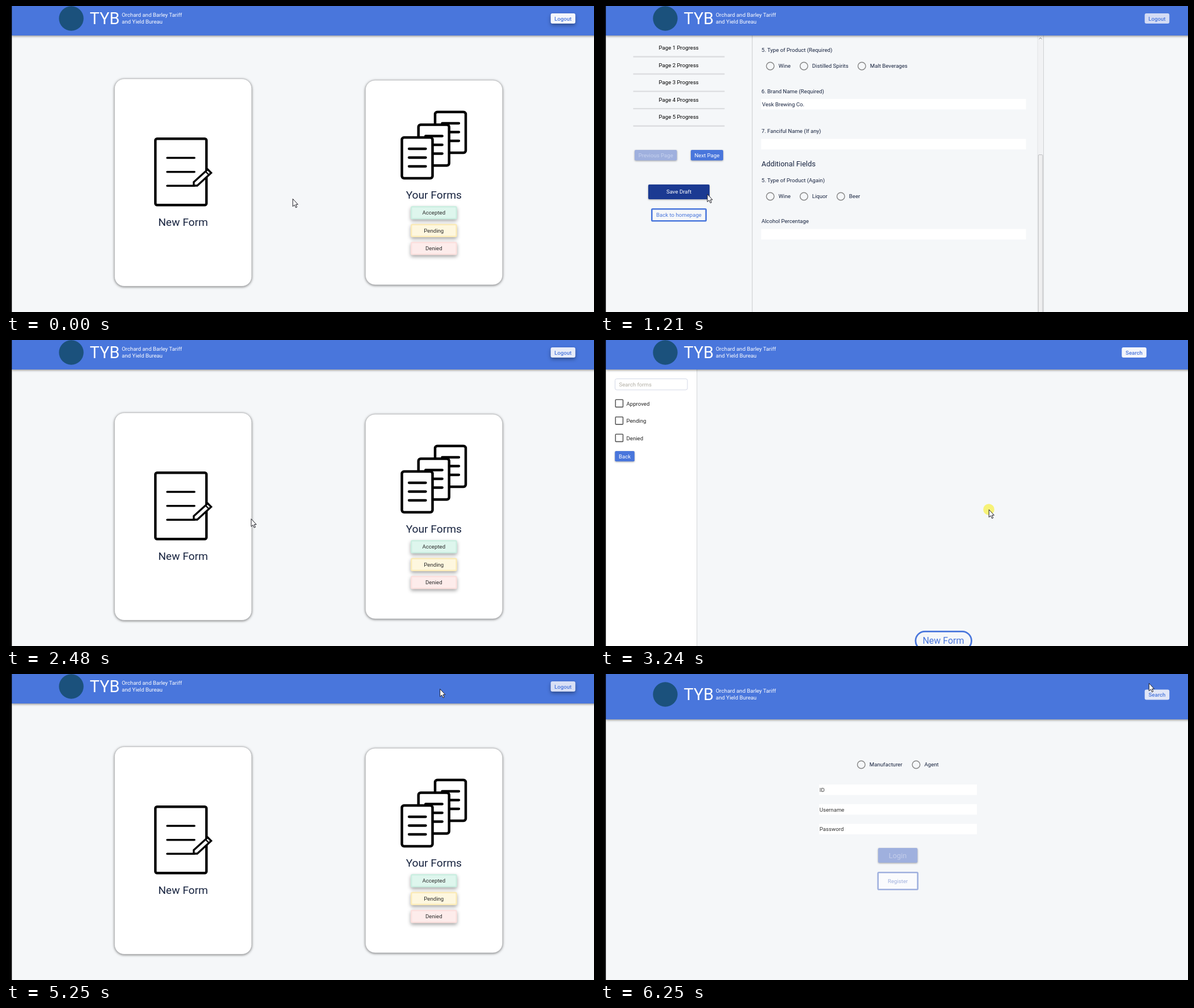
These frames come from a looping animation (1036x540 px, 6.44 s). An HTML page:

```html
<!DOCTYPE html>
<html lang="en">
<head>
<meta charset="utf-8">
<title>Permit forms demo</title>
<style>
html, body { margin: 0; width: 100%; height: 100%; overflow: hidden; background: #f5f7f9; }
svg { display: block; width: 1036px; height: 540px; font-family: Roboto, sans-serif; }
.low { filter: drop-shadow(0 1px 1.5px rgba(0,0,0,.35)); }
.mid { filter: drop-shadow(0 1px 2px rgba(0,0,0,.5)); }
.high { filter: drop-shadow(0 3px 3px rgba(0,0,0,.35)); }
</style>
</head>
<body>
<svg id="stage" viewBox="0 0 1036 540"></svg>
<script>
const LOOP = 6440;
const BLUE = '#4976dc', DARK = '#1b3a92', INK = '#17233f', BG = '#f5f7f9', PALE = '#9fb0de';

// Markup helpers
const rect = (x, y, w, h, fill, more = '') =>
  `<rect x="${x}" y="${y}" width="${w}" height="${h}" fill="${fill}" ${more}/>`;
const text = (x, mid, str, { size = 9.65, fill = INK, anchor = 'start', weight = 400 } = {}) =>
  `<text x="${x}" y="${mid + size * 0.36}" font-size="${size}" fill="${fill}" text-anchor="${anchor}" font-weight="${weight}">${str}</text>`;
const label = (x, mid, str, opt = {}) => text(x, mid, str, { anchor: 'middle', ...opt });
const line = (x1, y1, x2, y2, stroke, w = 1, cap = 'butt') =>
  `<path d="M${x1} ${y1}L${x2} ${y2}" stroke="${stroke}" stroke-width="${w}" stroke-linecap="${cap}"/>`;
const input = (x, y, w) => rect(x, y, w, 18.5, '#fff');
const radio = (x, y, str, gap = 14.5) =>
  `<circle cx="${x}" cy="${y}" r="6.8" fill="none" stroke="#858585" stroke-width="1.4"/>` + text(x + gap, y, str);
const button = (x, y, w, h, str, { fill = BLUE, color = '#fff', id = '', size } = {}) =>
  rect(x, y, w, h, fill, `rx="2" class="low" ${id && `id="${id}"`}`) +
  label(x + w / 2, y + h / 2, str, { fill: color, ...(size && { size }) });

function header(height, btn, btnX, btnCls = '') {
  const mid = height - (height > 60 ? 44 : 30);
  const btnY = height > 60 ? 27.5 : 13;
  return rect(10, -10, 1040, height + 10, BLUE, 'class="mid"') +
    `<circle cx="115" cy="${mid}" r="21.7" fill="#1b517c"/>` +
    text(147.5, mid - 0.7, 'TYB', { size: 28.8, fill: '#fff' }) +
    text(204, mid - 6, 'Orchard and Barley Tariff', { fill: '#fff' }) +
    text(204, mid + 5.3, 'and Yield Bureau', { fill: '#fff' }) +
    rect(btnX, btnY, 43.5, 18, '#f4f6fb', `rx="3" class="nav ${btnCls}"`) +
    label(btnX + 21.7, btnY + 9.2, btn, { fill: BLUE, weight: 500 });
}

function sheet(x, y) {
  let s = rect(x, y, 54, 72, '#fff', 'rx="4" stroke="#000" stroke-width="4.5"');
  for (let i = 0; i < 3; i++) s += line(x + 12.5, y + 20 + i * 15.5, x + 42, y + 20 + i * 15.5, '#000', 4.3, 'round');
  return s;
}

function tag(y, str, fill, edge) {
  return rect(714.2, y + 1.2, 79.3, 21, fill, `rx="2" stroke="${edge}" stroke-width="2.5" class="high"`) +
    label(753.8, y + 11.7, str, { fill: '#2b2b2b' });
}

function home() {
  const card = (x, y, h) => rect(x, y, 241.5, h, '#fff', 'rx="17" stroke="#bdbec1" stroke-width=".8" class="mid"');
  return card(191.3, 128.5, 366) + card(633.3, 131, 361) +
    rect(263.2, 234.3, 90, 117, '#fff', 'rx="3" stroke="#000" stroke-width="4.4"') +
    [268, 292.7, 317.3].map(y => line(284, y, 332, y, '#000', 3.6, 'round')).join('') +
    '<path d="M330.8 317V310.8L355.5 288.3L361.5 294.5L337 317Z" fill="#fff" stroke="#000" stroke-width="3.4"/>' +
    line(351.5, 292, 357.5, 298, '#000', 2.4) +
    label(312, 380.7, 'New Form', { size: 19.2 }) +
    sheet(756, 187) + sheet(726.7, 209.5) + sheet(697.5, 232) +
    label(753.8, 333.5, 'Your Forms', { size: 19.2 }) +
    tag(353, 'Accepted', '#def6ed', '#cbeee1') +
    tag(384.5, 'Pending', '#fef7df', '#fbebb8') +
    tag(416, 'Denied', '#fdeceb', '#fbe0de') +
    header(52, 'Logout', 959.7, 'high');
}

function form() {
  let s = '';
  for (let i = 0; i < 5; i++) {
    const y = 73.7 + i * 30.55;
    s += label(138.7, y, `Page ${i + 1} Progress`, { fill: '#000' }) +
      line(58.5, y + 15.8, 219.5, y + 15.8, '#dcdde0', 2.4);
  }
  s += button(61, 254, 74.5, 18.5, 'Previous Page', { fill: PALE, color: '#c6d1ee' }) +
    button(160, 254, 57, 18.5, 'Next Page') +
    button(85, 315, 108, 26, 'Save Draft', { id: 'save' }) +
    rect(91.3, 358.3, 95.5, 21, BG, `id="backBox" rx="1.5" stroke="${BLUE}" stroke-width="2.6"`) +
    `<g id="backText">${label(139, 368.7, 'Back to homepage')}</g>` +
    rect(771, 52, 10.5, 490, '#f1f2f4') +
    line(268.2, 52, 268.2, 540, '#c9cacd') + line(781.5, 52, 781.5, 540, '#cfd0d3') +
    line(771, 52, 771, 540, '#e2e3e6') +
    '<path d="M773.5 58.5L776 56L778.5 58.5" fill="none" stroke="#8b8b8b"/>' +
    rect(772.3, 262.5, 7.6, 290, '#efeff0', 'rx="1.5" stroke="#bcbdc0"');
  s += text(284.5, 78, '5. Type of Product (Required)') +
    radio(300, 106, 'Wine') + radio(359.3, 106, 'Distilled Spirits') + radio(461.3, 106, 'Malt Beverages') +
    text(284.5, 150.3, '6. Brand Name (Required)') + input(284, 164, 466.5) +
    text(285.5, 173.7, 'Vesk Brewing Co.') +
    text(284.5, 221, '7. Fanciful Name (If any)') + input(284, 234.5, 466.5) +
    text(284.5, 278, 'Additional Fields', { size: 12.9 }) +
    text(284.5, 308, '5. Type of Product (Again)') +
    radio(300, 336, 'Wine') + radio(359.3, 336, 'Liquor') + radio(424.3, 336, 'Beer') +
    text(284.5, 380, 'Alcohol Percentage') + input(284, 393.5, 466.5);
  return s + header(52, 'Logout', 959.7);
}

function search() {
  const box = (y, str) => rect(27.3, y - 6.8, 13.2, 13.2, '#fff', 'rx="1" stroke="#5a5a5a" stroke-width="1.6"') +
    text(46.5, y + 0.3, str, { fill: '#222' });
  return rect(10, 40, 160.5, 500, '#fff') + line(170.8, 40, 170.8, 540, '#d3d5d8') +
    rect(26.5, 68.5, 127.5, 19.5, '#fff', 'rx="3" stroke="#d3d8e6"') +
    text(33.5, 78.7, 'Search forms', { fill: '#b1aea4' }) +
    box(112, 'Approved') + box(142.5, 'Pending') + box(173, 'Denied') +
    button(26.3, 196, 34.5, 18.3, 'Back', { id: 'back' }) +
    rect(556, 514.3, 98.5, 33, BG, `rx="16.5" stroke="${BLUE}" stroke-width="2.8"`) +
    label(605, 530.5, 'New Form', { size: 16, fill: BLUE }) +
    header(52, 'Search', 919.3);
}

function login() {
  const field = (y, str) => input(386, y, 278) + text(386.8, y + 9.5, str, { fill: '#333' });
  return radio(460.3, 160, 'Manufacturer') + radio(557, 160, 'Agent') +
    field(195, 'ID') + field(229.7, 'Username') + field(264.4, 'Password') +
    button(490, 307, 69.3, 26, 'Login', { fill: PALE, color: '#c3cdea', size: 12.8 }) +
    rect(489.8, 350.2, 70, 30, '#fafbfd', `rx="1.5" stroke="${PALE}" stroke-width="2.6"`) +
    label(524.7, 365.5, 'Register', { fill: PALE }) +
    header(80, 'Search', 959.7);
}

const pages = { home, form, search, login };
const stage = document.getElementById('stage');
stage.innerHTML = rect(0, 0, 1036, 540, BG) +
  Object.keys(pages).map(k => `<g id="${k}">${pages[k]()}</g>`).join('') +
  rect(0, 0, 10.3, 540, '#000') +
  '<circle id="halo" r="9.8" fill="#f6f16c" opacity=".92"/>' +
  '<path id="cursor" d="M.3 .3V13.8L3.4 11L5.6 15.8L7.7 14.9L5.6 10.2H9.4Z" fill="#fff" stroke="#1c1c24" stroke-width="1" stroke-linejoin="round"/>';

const $ = id => document.getElementById(id);
const groups = Object.keys(pages).map($);

// Page start, name, start of the nav button fade, final fade level
const timeline = [
  [0, 'home', LOOP, 0],
  [580, 'form', 480, 1],
  [2230, 'home', 2280, 1],
  [3150, 'search', 3220, 1],
  [4820, 'home', 4830, 1],
  [5800, 'login', 5800, 0.65]
];

// Cursor legs: start, end, target, optional bend point
const start = [505, 340];
const legs = [
  [40, 340, [370, 295]],
  [720, 1350, [163, 337]],
  [1380, 1760, [154, 360]],
  [1800, 2000, [167, 364]],
  [2030, 2080, [268, 326]],
  [2190, 2870, [685, 299]],
  [3450, 4090, [75, 314], [340, 533]],
  [4100, 4600, [42, 212]],
  [4780, 5455, [967, 16], [504, 18]]
];
const clicks = [[330, 580], [1970, 2040], [2960, 3330], [4700, 4820], [5490, 5850]];

const clamp = v => Math.max(0, Math.min(1, v));
const ease = u => u * u * (3 - 2 * u);
const within = (t, a, b) => t >= a && t < b;

function cursorAt(t) {
  let p = start;
  for (const [a, b, q, bend] of legs) {
    if (t < a) break;
    const u = ease(clamp((t - a) / (b - a)));
    const from = p, c = bend || [(p[0] + q[0]) / 2, (p[1] + q[1]) / 2];
    p = q.map((v, i) => (1 - u) ** 2 * from[i] + 2 * u * (1 - u) * c[i] + u * u * v);
  }
  return p;
}

function draw(t) {
  const [, name, fadeStart, level] = timeline.filter(p => p[0] <= t).pop();
  for (const g of groups) g.style.display = g.id === name ? '' : 'none';

  const f = level * clamp((t - fadeStart) / 500);
  const mix = (a, b) => Math.round(a + (b - a) * f);
  $(name).querySelector('.nav').setAttribute('fill', `rgb(${mix(244, 211)},${mix(246, 219)},${mix(251, 244)})`);

  const [x, y] = cursorAt(t);
  const over = (l, top, r, bottom) => x >= l && x <= r && y >= top && y <= bottom;
  $('save').setAttribute('fill', over(85, 315, 193, 341) ? DARK : BLUE);
  const hot = over(90, 357, 188, 381) || within(t, 2000, 2230);
  $('backBox').setAttribute('fill', hot ? BLUE : BG);
  $('backText').firstChild.setAttribute('fill', hot ? '#fff' : BLUE);
  $('back').setAttribute('fill', over(26, 196, 61, 215) ? DARK : BLUE);

  const move = `translate(${x.toFixed(1)} ${y.toFixed(1)})`;
  $('cursor').setAttribute('transform', move);
  $('halo').setAttribute('transform', move);
  $('halo').style.display = clicks.some(([a, b]) => within(t, a, b)) ? '' : 'none';
}

const begin = performance.now();
function tick() {
  draw((performance.now() - begin) % LOOP);
  requestAnimationFrame(tick);
}
tick();
</script>
</body>
</html>
```
